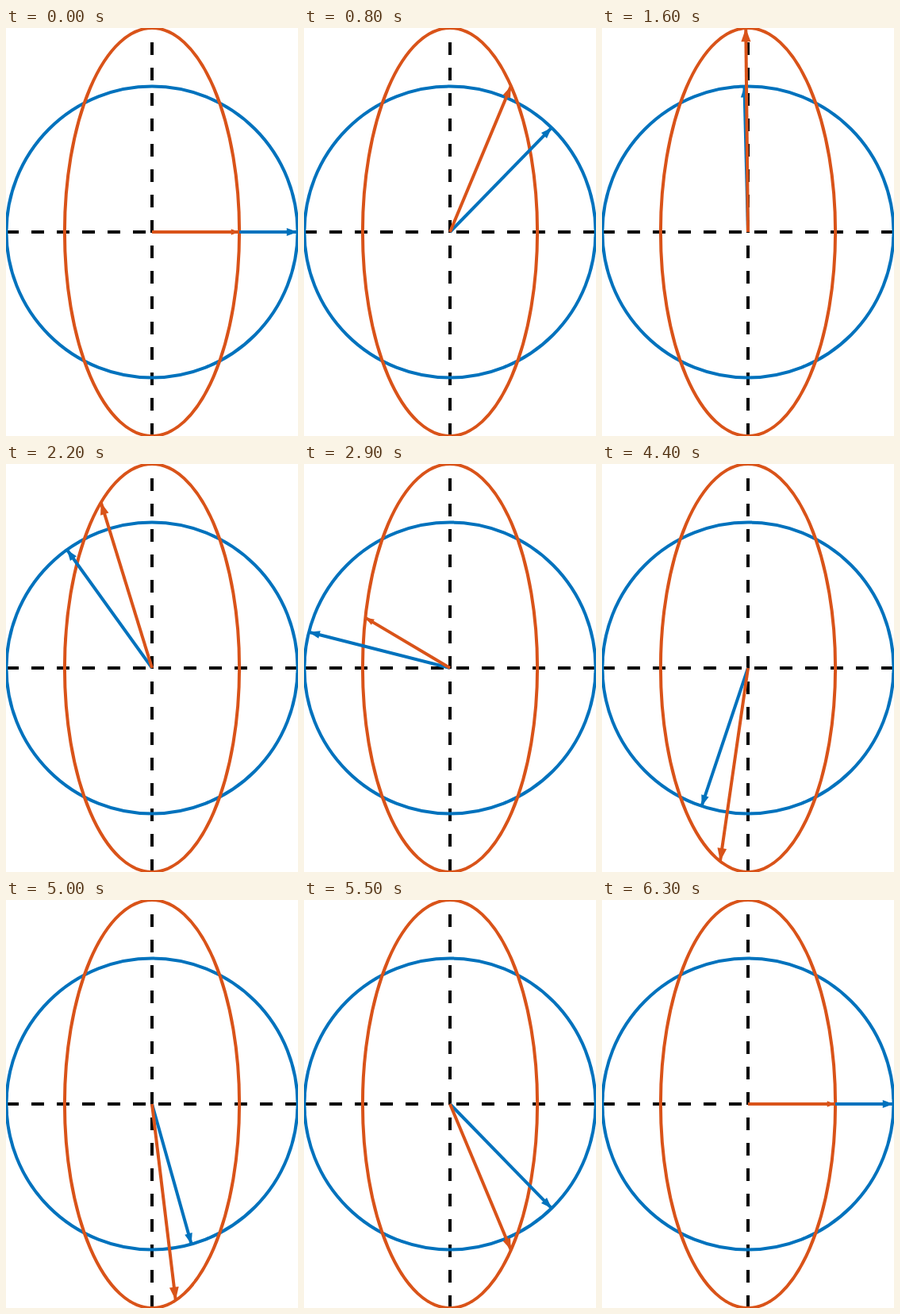
These frames come from a looping animation (368x514 px, 6.4 s). An HTML page:

```html
<!DOCTYPE html>
<html lang="en">
<head>
<meta charset="utf-8">
<title>Circle and ellipse vectors</title>
<style>
html, body { margin: 0; width: 100%; height: 100%; overflow: hidden; background: #fff; }
svg { display: block; width: 368px; height: 514px; }
.line { fill: none; stroke-width: 4; }
.axis { stroke: #000; stroke-dasharray: 16 16; }
.blue { stroke: #0072bd; }
.red { stroke: #d95319; }
.blue-fill { fill: #0072bd; }
.red-fill { fill: #d95319; }
</style>
</head>
<body>
<svg viewBox="0 0 368 514">
  <path class="line axis" d="M0 257H368"/>
  <path class="line axis" d="M184 514V0"/>
  <ellipse class="line blue" cx="184" cy="257" rx="183.5" ry="183.5"/>
  <ellipse class="line red" cx="184" cy="257" rx="110.1" ry="256.9"/>
  <path id="blueShaft" class="line blue"/>
  <path id="blueHead" class="blue-fill"/>
  <path id="redShaft" class="line red"/>
  <path id="redHead" class="red-fill"/>
</svg>
<script>
const CX = 184, CY = 257, STEPS = 64, STEP_MS = 100;
const byId = id => document.getElementById(id);
const arrows = [
  { name: 'blue', rx: 183.5, ry: 183.5 },
  { name: 'red', rx: 110.1, ry: 256.9 }
].map(a => ({ ...a, shaft: byId(a.name + 'Shaft'), head: byId(a.name + 'Head') }));

function drawArrow(a, angle) {
  const dx = a.rx * Math.cos(angle), dy = -a.ry * Math.sin(angle);
  const len = Math.hypot(dx, dy), ux = dx / len, uy = dy / len;
  const headLen = 5.5 + 0.045 * len, half = 2 + 0.0158 * len;
  // Point measured along the arrow and sideways from it
  const at = (along, side) =>
    (CX + ux * along - uy * side).toFixed(2) + ' ' + (CY + uy * along + ux * side).toFixed(2);
  a.shaft.setAttribute('d', `M${at(0, 0)}L${at(len, 0)}`);
  a.head.setAttribute('d',
    `M${at(len, 0)}L${at(len - headLen, half)}L${at(len - headLen, -half)}Z`);
}

function render(ms) {
  const step = Math.floor(ms / STEP_MS) % STEPS;
  const angle = 2 * Math.PI * step / (STEPS - 1);
  arrows.forEach(a => drawArrow(a, angle));
}

const start = performance.now();
function tick() {
  render(performance.now() - start);
  requestAnimationFrame(tick);
}
tick();
</script>
</body>
</html>
```
